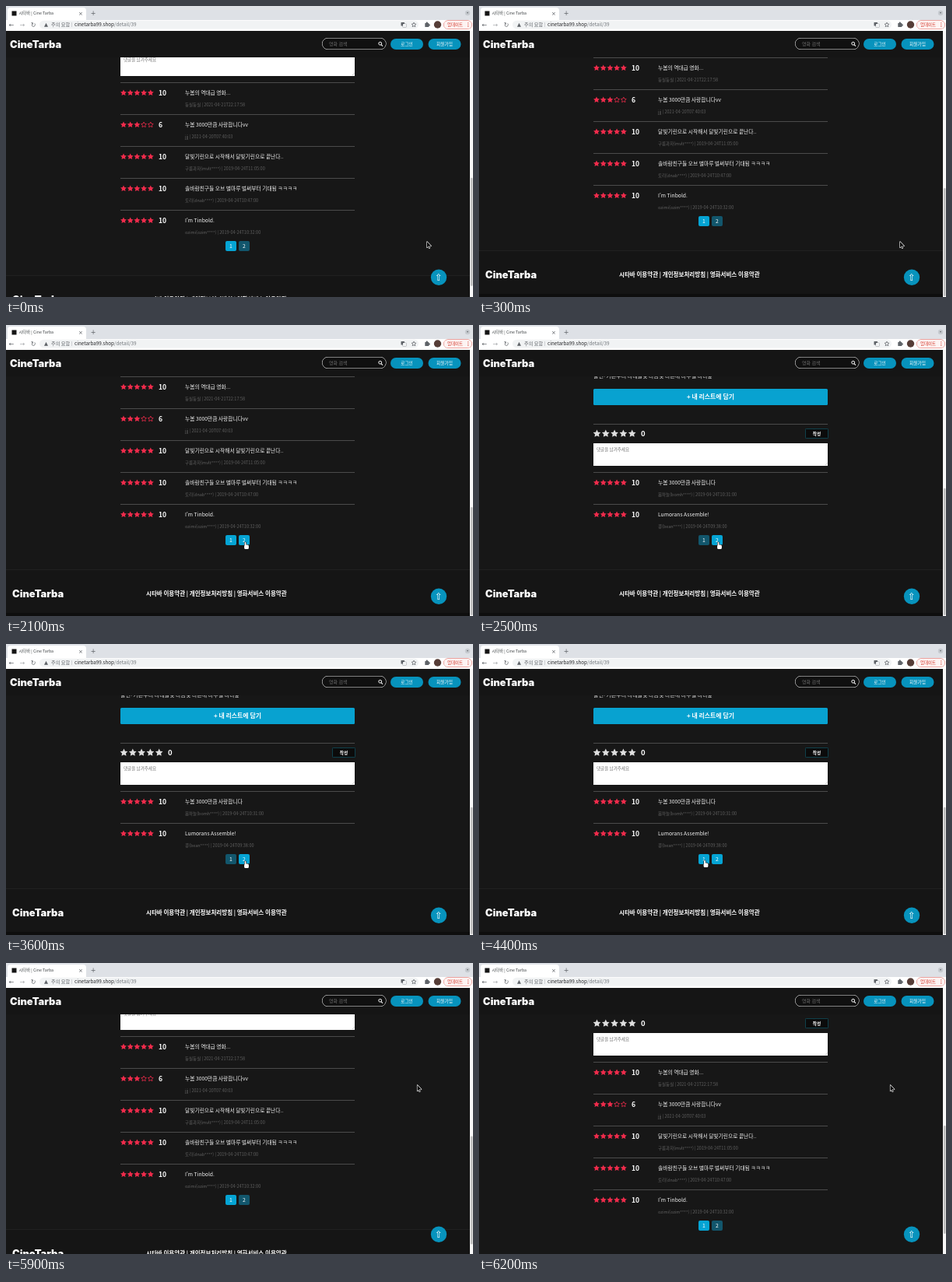
An HTML page with a canvas that plays this animation: 600x374 px, repeating every 6.3 s.

```html
<!DOCTYPE html>
<html lang="ko">
<head>
<meta charset="utf-8">
<title>시타바 | Cine Tarba</title>
<style>
html, body { margin: 0; width: 100%; height: 100%; overflow: hidden; background: #171717; }
canvas { display: block; width: 600px; height: 374px; }
</style>
</head>
<body>
<canvas id="stage" width="600" height="374"></canvas>
<script>
const ctx = document.getElementById('stage').getContext('2d');
const LOOP = 6300, STEP = 100;
const SANS = '"Noto Sans CJK KR", "Noto Sans CJK", "Noto Sans", sans-serif';
const SYMBOLS = '"DejaVu Sans", sans-serif';
const BRAND = 'CineTarba';
const BLUE = '#0793bd', ACTIVE = '#05a4d4', DIM = '#12566c', RED = '#ee2b4b';
const GREY = '#5f6368', LINE = '#4b4b4b';

// Content column, review pitch and bottom edge of the list
const LEFT = 147, WIDTH = 301, PITCH = 41, LIST_END = 271;

const PAGES = [
  [
    { score: 5, title: '누봄의 역대급 영화...', byline: '둥실둥실 | 2021-04-21T22:17:58' },
    { score: 3, title: '누봄 3000만큼 사랑합니다vv', byline: 'jjj | 2021-04-20T07:40:03' },
    { score: 5, title: '달빛기린으로 시작해서 달빛기린으로 끝난다..', byline: '구름과자(mvlt****) | 2019-04-24T11:05:00' },
    { score: 5, title: '솔바람친구들 오브 별마루 벌써부터 기대됨 ㅋㅋㅋㅋ', byline: '토리(dnab****) | 2019-04-24T10:47:00' },
    { score: 5, title: "I'm Tinbold.", byline: 'ozimi(ozim****) | 2019-04-24T10:32:00' }
  ],
  [
    { score: 5, title: '누봄 3000만큼 사랑합니다', byline: '봄하늘(bomh****) | 2019-04-24T10:31:00' },
    { score: 5, title: 'Lumorans Assemble!', byline: '콩(bean****) | 2019-04-24T09:38:00' }
  ]
];

const POINTER_START = { x: 541, y: 303 };
const POINTER_MOVES = [
  { from: 600, to: 1300, x: 342, y: 293.5 },
  { from: 1300, to: 2000, x: 307.5, y: 279 },
  { from: 3800, to: 4400, x: 290, y: 278 },
  { from: 4600, to: 5300, x: 528.5, y: 157 }
];

function ease(t, from, to) {
  const p = Math.min(1, Math.max(0, (t - from) / (to - from)));
  return p * p * (3 - 2 * p);
}

function scrollAt(t) {
  const settling = 32 * Math.max(0, 1 - t / 300) ** 2;
  return settling + 61 * ease(t, 5630, 6200);
}

function pointerAt(t) {
  return POINTER_MOVES.reduce((at, move) => {
    const p = ease(t, move.from, move.to);
    return { x: at.x + (move.x - at.x) * p, y: at.y + (move.y - at.y) * p };
  }, POINTER_START);
}

function rect(x, y, w, h, color) {
  ctx.fillStyle = color;
  ctx.fillRect(x, y, w, h);
}

function paint(fill, stroke, width = 1) {
  if (stroke) { ctx.strokeStyle = stroke; ctx.lineWidth = width; ctx.stroke(); }
  if (fill) { ctx.fillStyle = fill; ctx.fill(); }
}

function pill(x, y, w, h, r, fill, stroke, width) {
  ctx.beginPath();
  ctx.roundRect(x, y, w, h, r);
  paint(fill, stroke, width);
}

function circle(x, y, r, fill, stroke, width) {
  ctx.beginPath();
  ctx.arc(x, y, r, 0, Math.PI * 2);
  paint(fill, stroke, width);
}

function line(x1, y1, x2, y2, color, width) {
  ctx.beginPath();
  ctx.moveTo(x1, y1);
  ctx.lineTo(x2, y2);
  paint(null, color, width);
}

// y is the middle of the capitals
function text(str, x, y, size, color, { weight = 400, align = 'left', family = SANS } = {}) {
  ctx.font = `${weight} ${size}px ${family}`;
  ctx.textAlign = align;
  ctx.fillStyle = color;
  ctx.fillText(str, x, y + size * 0.36);
  return ctx.measureText(str).width;
}

function symbol(str, x, y, size, color = GREY) {
  text(str, x, y, size, color, { align: 'center', family: SYMBOLS });
}

function star(x, y, r, fill, stroke) {
  ctx.beginPath();
  for (let i = 0; i < 10; i++) {
    const a = i * Math.PI / 5 - Math.PI / 2, d = i % 2 ? r * 0.5 : r;
    ctx.lineTo(x + d * Math.cos(a), y + d * Math.sin(a));
  }
  ctx.closePath();
  ctx.lineJoin = 'round';
  paint(fill, stroke, 0.8);
}

function logo(x, y) {
  text(BRAND, x, y, 12.9, '#fff', { weight: 900, family: 'Inter, sans-serif' });
}

function drawBrowser() {
  rect(0, 0, 600, 18, '#dee1e6');
  pill(2, 2, 101, 20, 4, '#fff');
  rect(0, 18, 600, 14, '#fff');
  rect(7.5, 6.5, 6, 6, '#151515');
  text('시타바 | Cine Tarba', 16.5, 9.3, 5.3, '#3c4043');
  symbol('×', 96, 9.3, 7);
  symbol('+', 112, 9.3, 8);
  circle(593, 9, 3.2, '#c6cacf');
  symbol('▾', 593, 9, 4);

  symbol('←', 7, 24, 8);
  symbol('→', 21, 24, 8, '#a5a8ab');
  symbol('↻', 35, 24, 8);
  pill(43, 18.8, 487, 10.6, 5.3, '#f1f3f4');
  symbol('▲', 51.5, 23.7, 6.5);
  text('주의 요함', 58, 24.1, 6.2, GREY);
  rect(84, 21, 1, 6, '#cfd1d4');
  const hostWidth = text('cinetarba99.shop', 88, 24.1, 6.3, '#202124');
  text('/detail/39', 88 + hostWidth, 24.1, 6.3, '#70757a');

  pill(507.5, 21, 4.5, 4.5, 0.5, GREY);
  pill(510, 23, 4, 4.5, 0.5, '#f1f3f4', GREY, 0.6);
  star(524, 24.2, 3, null, GREY);
  pill(538.3, 22, 5, 5, 0.5, GREY);
  circle(540.8, 21.8, 1.2, GREY);
  circle(543.6, 24.5, 1.2, GREY);
  circle(554.5, 24, 4.7, '#563d37');
  pill(562.5, 18.9, 36, 10.4, 5.2, '#fdf3f2', '#d9453a', 0.8);
  text('업데이트', 567, 24.1, 5.4, '#d33427', { weight: 500 });
  for (let i = -1; i <= 1; i++) circle(593.8, 24 + i * 2.2, 0.6, '#d33427');
}

function drawHeader() {
  rect(0, 32, 596, 34, '#151515');
  logo(5, 49);
  pill(406.5, 41.5, 81.5, 14, 7, '#101010', '#f2f2f2', 1.1);
  text('영화 검색', 415, 49, 6, '#6f6f6f');
  circle(480.7, 48.2, 1.9, null, '#fff');
  line(482, 49.6, 484, 51.6, '#fff', 1.1);
  ['로그인', '회원가입'].forEach((label, i) => {
    const x = 494 + i * 48.5;
    pill(x, 42, 42, 14, 7, BLUE);
    text(label, x + 21, 49, 5.7, '#fff', { align: 'center' });
  });
}

function drawForm(top) {
  text('출연: 가온누리 나래솔빛 다솜빛 라온해 마루별 바다숲', LEFT, top - 123.5, 7, '#ddd');
  pill(LEFT, top - 107, WIDTH, 21, 1.5, '#08a2d0');
  text('+ 내 리스트에 담기', LEFT + WIDTH / 2, top - 96.5, 7.9, '#fff', { weight: 700, align: 'center' });
  rect(LEFT, top - 62, WIDTH, 1, LINE);
  for (let i = 0; i < 5; i++) star(151.5 + i * 11.3, top - 49.3, 5.1, '#dedede');
  text('0', 208, top - 49.2, 9.5, '#fff', { weight: 700 });
  pill(419.5, top - 55.5, 29, 12, 1, '#0b0b0b', '#14778c');
  text('작성', 434, top - 49.5, 5.7, '#fff', { weight: 700, align: 'center' });
  rect(LEFT, top - 37, WIDTH, 29, '#fff');
  text('댓글을 남겨주세요', 151, top - 28.7, 5.55, '#757575');
  line(445, top - 9, 447.5, top - 11.5, '#999', 0.5);
}

function drawReview({ score, title, byline }, y) {
  rect(LEFT, y, WIDTH, 1, LINE);
  for (let i = 0; i < 5; i++) {
    const x = 151 + i * 8.7;
    if (i < score) star(x, y + 13.7, 4.2, RED);
    else star(x, y + 13.7, 3.6, null, RED);
  }
  text(score * 2, 196, y + 13.9, 8.6, '#fff', { weight: 700 });
  text(title, 230, y + 14, 6.75, '#f2f2f2');
  text(byline, 230, y + 29.1, 5.5, '#606060');
}

function drawPagination(page, hover, y) {
  PAGES.forEach((_, i) => {
    const x = buttonLeft(i);
    pill(x, y, 14, 13, 2, i === page || i === hover ? ACTIVE : DIM);
    text(i + 1, x + 7, y + 6.6, 6.8, '#fff', { align: 'center' });
  });
}

function drawFooter(y) {
  rect(0, y, 596, 61, '#151515');
  rect(0, y, 596, 1, '#202020');
  logo(8, y + 31);
  text('시타바 이용약관 | 개인정보처리방침 | 영화서비스 이용약관', 180, y + 31.2, 7.53, '#fff', { weight: 700 });
  rect(0, y + 56, 596, 4, '#0e0e0e');
}

function drawPage(page, scroll, hover) {
  rect(0, 32, 596, 342, '#171717');
  ctx.save();
  ctx.beginPath();
  ctx.rect(0, 66, 596, 308);
  ctx.clip();
  ctx.translate(0, scroll);
  const reviews = PAGES[page];
  const top = LIST_END - PITCH * reviews.length;
  drawForm(top);
  reviews.forEach((review, i) => drawReview(review, top + PITCH * i));
  drawPagination(page, hover, 270);
  drawFooter(314);
  ctx.restore();
}

function drawFixed(page, scroll) {
  circle(556, 348.7, 10.2, BLUE);
  symbol('⇧', 556, 348.7, 12, '#fff');
  const view = 342, pageHeight = page ? 712 : 835;
  const length = view * view / pageHeight;
  rect(596, 32, 4, view, '#f7f7f7');
  pill(597, 374 - length - scroll * view / pageHeight, 2.6, length - 1, 1.3, '#bdbdbd');
}

function drawHand() {
  ctx.beginPath();
  ctx.roundRect(-0.9, 0, 1.8, 7, 0.9);
  ctx.roundRect(-1.4, 3.6, 5.8, 5.4, 1.6);
  paint('#fff', '#111', 1.2);
}

function drawArrow() {
  ctx.beginPath();
  ctx.lineTo(0, 0);
  ctx.lineTo(0, 7.5);
  ctx.lineTo(1.9, 5.9);
  ctx.lineTo(5.2, 5.4);
  ctx.closePath();
  paint('#050505', '#fff', 1.2);
  line(1.9, 5.5, 3.3, 8.6, '#fff', 2);
  line(1.7, 5, 3.1, 8.1, '#050505', 1);
}

function drawPointer({ x, y }, isHand) {
  ctx.save();
  ctx.translate(x, y);
  if (isHand) drawHand();
  else drawArrow();
  ctx.restore();
}

function buttonLeft(i) {
  return 282 + i * 17;
}

function hoveredButton({ x, y }) {
  if (y < 270 || y > 283) return -1;
  return PAGES.findIndex((_, i) => x >= buttonLeft(i) && x <= buttonLeft(i) + 14);
}

function draw(now) {
  const t = Math.floor((now % LOOP) / STEP) * STEP;
  const page = t >= 2300 && t < 4600 ? 1 : 0;
  const scroll = Math.round(scrollAt(t));
  const pointer = pointerAt(t);
  const hover = hoveredButton(pointer);
  drawPage(page, scroll, hover);
  drawHeader();
  drawBrowser();
  drawFixed(page, scroll);
  drawPointer(pointer, hover >= 0);
}

const start = performance.now();
function tick() {
  draw(performance.now() - start);
  requestAnimationFrame(tick);
}
tick();
</script>
</body>
</html>
```
